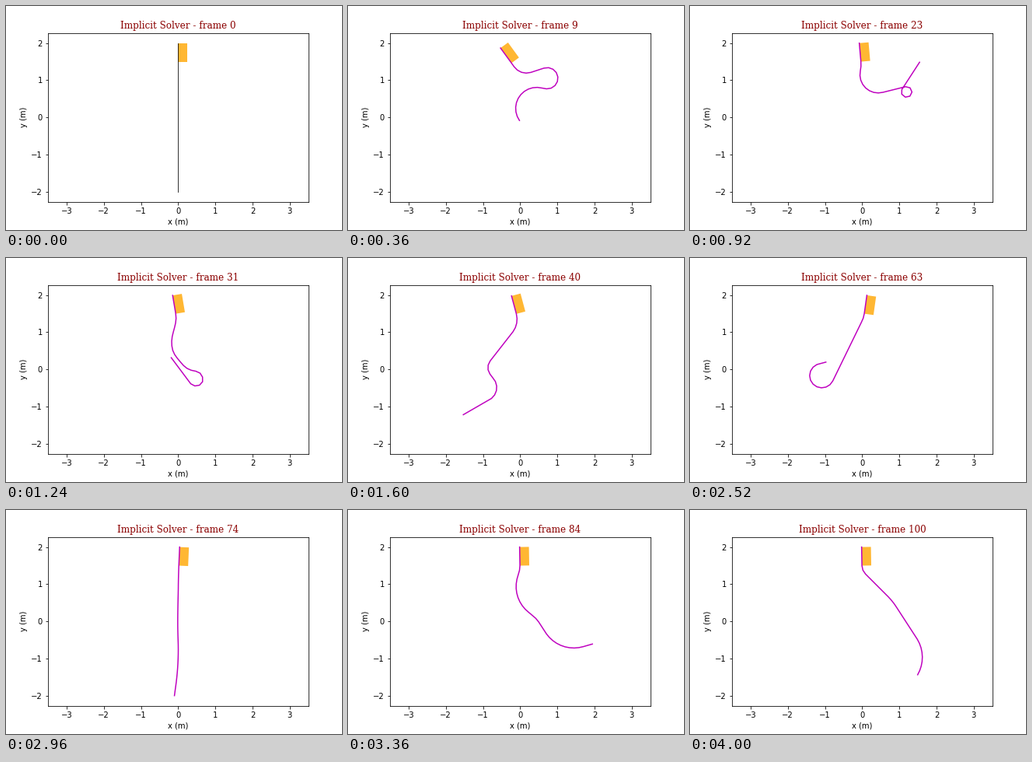
Animation of 432 by 288 pixels, one loop 4040 ms. Source, as a matplotlib script:

```python
import numpy as np
import matplotlib.pyplot as plt
from matplotlib.animation import FuncAnimation
from matplotlib.patches import Rectangle

FRAMES, INTERVAL = 101, 40
GRIP, ROPE, SEGS = 0.5, 3.5, 28
STEP = ROPE / SEGS


def pose(grip, *bends):
    """Headings in degrees from straight down: the grip, then each segment.

    A bend (start, end, turn) is a circular arc; start and end are
    centimetres along the rope.
    """
    s = 100 * STEP * (np.arange(SEGS) + 0.5)
    turns = sum(turn * np.clip((s - a) / (b - a), 0, 1) for a, b, turn in bends)
    return np.r_[grip, grip + turns * np.ones(SEGS)]


POSES = {
    0: pose(0),
    9: pose(36, (13, 63, 72), (100, 203, -208), (217, 350, 135)),
    23: pose(5, (0, 25, -17), (25, 124, 116), (187, 264, -317)),
    40: pose(15, (0, 52, -53), (150, 188, 75), (205, 268, -97)),
    52: pose(0, (0, 290, -88)),
    63: pose(-8, (0, 21, -18), (200, 330, -229)),
    75: pose(-2, (0, 350, 12)),
    84: pose(1, (0, 17, -17), (33, 134, 66), (155, 176, -17), (209, 324, 73)),
    92: pose(0, (0, 290, 84)),
    100: pose(1, (0, 25, 44), (109, 146, -12), (247, 345, -60)),
}


def glide(t, x, y):
    """Monotone cubic through (x, y): eased, without overshoot."""
    h = np.diff(x)[:, None]
    d = np.diff(y, axis=0) / h
    a, b = d[:-1], d[1:]
    same = a * b > 0
    inner = np.where(same, 2 * a * b / np.where(same, a + b, 1), 0)
    m = np.vstack([d[:1], inner, d[-1:]])
    i = np.clip(np.searchsorted(x, t, side="right") - 1, 0, len(x) - 2)
    h = h[i]
    u = (t - x[i])[:, None] / h
    return ((1 + 2 * u) * (1 - u) ** 2 * y[i] + u * (1 - u) ** 2 * h * m[i]
            + u * u * (3 - 2 * u) * y[i + 1] + u * u * (u - 1) * h * m[i + 1])


headings = glide(np.arange(FRAMES), np.array(list(POSES), float),
                 np.array(list(POSES.values())))

plt.rcParams["font.family"] = "DejaVu Sans"
plt.rcParams["text.kerning_factor"] = 6
fig = plt.figure(figsize=(6, 4), dpi=72, facecolor="white")
fig.subplots_adjust(left=0.125, right=0.9, bottom=0.125, top=0.88)
ax = fig.add_subplot()
ax.set_xlim(-3.5, 3.5)
ax.set_ylim(-2.273, 2.273)
ax.set_xlabel("x (m)")
ax.set_ylabel("y (m)")
title = ax.set_title("", family="DejaVu Serif", size=12, color="darkred")
handle = ax.add_patch(Rectangle((0, 1.5), 0.25, GRIP, color="orange",
                                alpha=0.8, lw=0))
rope, = ax.plot([], [])


def draw(i):
    phi = np.radians(headings[i])
    steps = np.r_[GRIP, np.full(SEGS, STEP)]
    x = np.r_[0, np.cumsum(steps * np.sin(phi))]
    y = np.r_[0, np.cumsum(-steps * np.cos(phi))]
    # the hand sways on a small ellipse; it holds the lower end of the grip
    base = -0.4 * np.sin(phi[0]), 1.3 + 0.2 * np.cos(phi[0])
    rope.set_data(x - x[1] + base[0], y - y[1] + base[1])
    rope.set_color("m" if i else "k")
    rope.set_linewidth(1.5 if i else 0.8)
    handle.set_xy(base)
    handle.set_angle(headings[i, 0])
    title.set_text(f"Implicit Solver - frame {i}")
    return rope, handle, title


anim = FuncAnimation(fig, draw, frames=FRAMES, interval=INTERVAL,
                     repeat=True, repeat_delay=0, blit=False)
plt.show()
```
